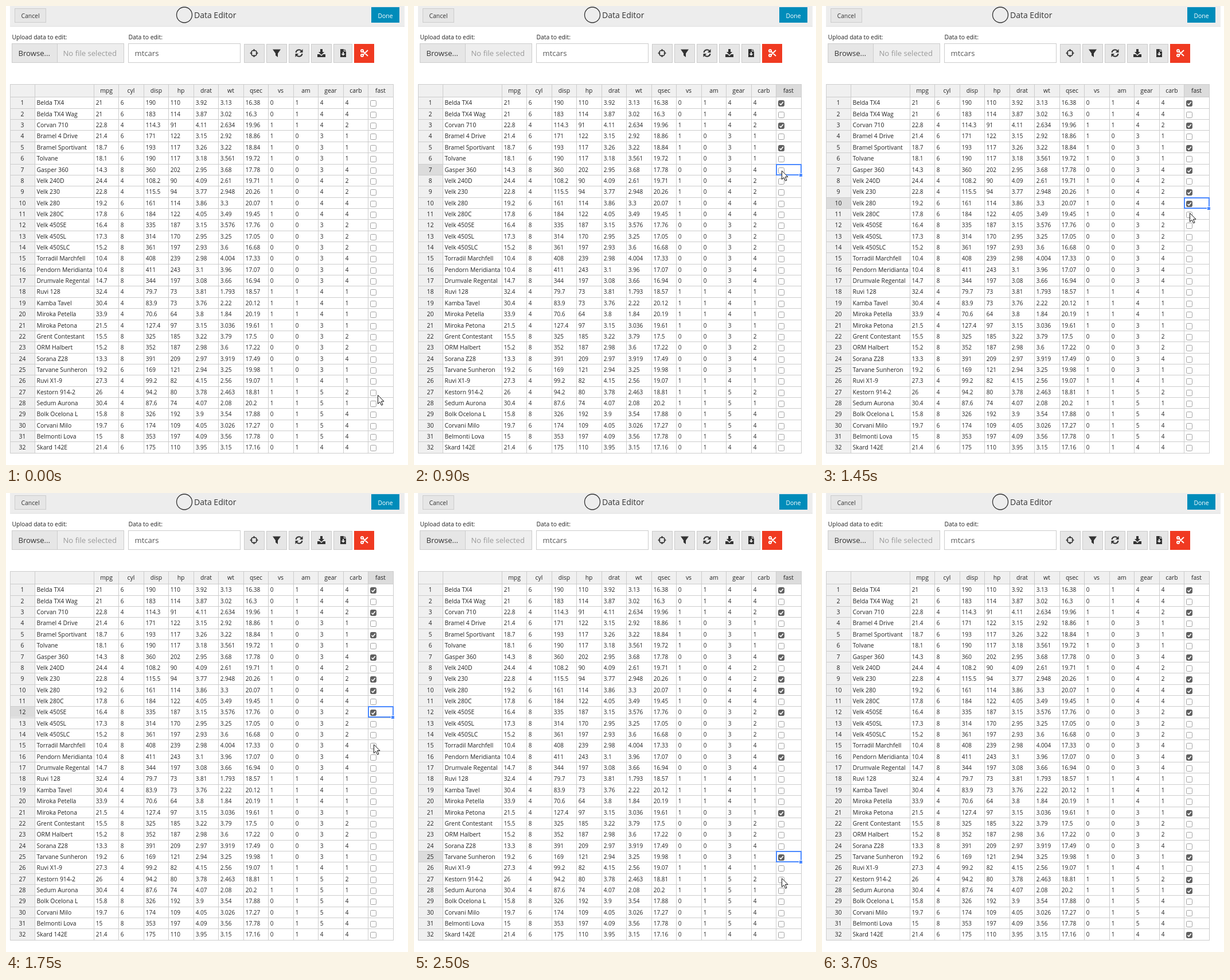
Write an HTML page with a canvas that moves like this. It is 701 by 799 pixels and loops after 3.8 s.

```html
<!DOCTYPE html>
<html lang="en">
<head>
<meta charset="utf-8">
<title>Data Editor</title>
<style>
  html, body { margin: 0; width: 701px; height: 799px; overflow: hidden; background: #fff; }
  canvas { display: block; }
</style>
</head>
<body>
<canvas id="stage" width="701" height="799"></canvas>
<script>
const ctx = document.getElementById('stage').getContext('2d');
const LOOP = 3800, STEP = 50, DESELECT = 3450;
const SMALL = 10.4, LARGE = 13.1;

const headers = 'mpg cyl disp hp drat wt qsec vs am gear carb fast'.split(' ');
const cars = `Belda TX4|21, Belda TX4 Wag|21, Corvan 710|22.8, Bramel 4 Drive|21.4,
Bramel Sportivant|18.7, Tolvane|18.1, Gasper 360|14.3, Velk 240D|24.4, Velk 230|22.8,
Velk 280|19.2, Velk 280C|17.8, Velk 450SE|16.4, Velk 450SL|17.3, Velk 450SLC|15.2,
Torradil Marchfell|10.4, Pendorn Meridianta|10.4, Drumvale Regental|14.7, Ruvi 128|32.4,
Kamba Tavel|30.4, Miroka Petella|33.9, Miroka Petona|21.5, Grent Contestant|15.5,
ORM Halbert|15.2, Sorana Z28|13.3, Tarvane Sunheron|19.2, Ruvi X1-9|27.3, Kestorn 914-2|26,
Sedum Aurona|30.4, Bolk Ocelona L|15.8, Corvani Milo|19.7, Belmonti Lova|15, Skard 142E|21.4`
  .split(/,\s+/).map(entry => entry.split('|'));

// Repeatable noise in -1..1
const noise = (row, salt) => {
  const v = Math.sin(row * 12.9898 + salt * 78.233) * 43758.5453;
  return 2 * (v - Math.floor(v)) - 1;
};
const within = (v, lo, hi) => v >= lo && v <= hi;

// Plausible specifications that follow from fuel economy and model group
function specs(mpg, row) {
  const cyl = mpg < 17.5 ? 8 : mpg <= 21.4 ? 6 : 4;
  const am = +(row <= 3 || within(row, 18, 20) || row >= 26);
  const gear = within(row, 27, 31) ? 5 : am || within(row, 8, 11) ? 4 : 3;
  const vs = +(cyl === 4 || cyl === 6 && !am);
  const carb = cyl === 8 ? (mpg < 15 || am ? 4 : 2)
    : cyl === 6 ? (vs && gear === 3 ? 1 : 4)
    : mpg > 27 || gear === 3 ? 1 : 2;
  const vary = (mean, spread, digits, salt) => +(mean + spread * noise(row, salt)).toFixed(digits);
  const disp = cyl === 4 ? vary(220 - 4.6 * mpg, 9, 1, 1) : vary(cyl === 6 ? 180 : 560 - 14 * mpg, 20, 0, 1);
  const hp = vary(cyl === 4 ? 155 - 2.7 * mpg : cyl === 6 ? 116 : 330 - 9 * mpg, 7, 0, 2);
  const drat = vary(gear === 3 ? 3.1 : 3.95, .2, 2, 3);
  const wt = vary(am ? 5.1 - .1 * mpg : 5 - .09 * mpg, .2, row % 3 ? 2 : 3, 4);
  const qsec = vary(vs ? 19.4 : 17, .9, 2, 5);
  return [mpg, cyl, disp, hp, drat, wt, qsec, vs, am, gear, carb];
}
const table = cars.map(([name, mpg], i) => ({ name, values: specs(+mpg, i + 1) }));

const colX = k => Math.floor(153 + 43.53 * k);
const rowY = r => Math.round(158.4 + 19.355 * (r - 1));

// Quick clicks first, then a slower steady pace
const clicks = [1, 3, 5, 7, 9, 10, 12, 16, 21, 25, 27, 28, 32]
  .map((row, k) => ({ row, time: k < 4 ? 450 + 150 * k : 1100 + 250 * (k - 4) }));

// [time, x, y] of the pointer tip
const path = [
  [0, 648, 677], [180, 670, 430],
  ...clicks.map(({ row, time }) => [time, 641, 147 + 19.9 * row]),
  [3300, 640, 792], [3550, 712, 790], [LOOP, 712, 790],
];

function box(x, y, w, h, fill, border) {
  ctx.fillStyle = border || fill;
  ctx.fillRect(x, y, w, h);
  if (border) {
    ctx.fillStyle = fill;
    ctx.fillRect(x + 1, y + 1, w - 2, h - 2);
  }
}

function text(str, x, y, size = SMALL, color = '#222', align = 'left') {
  ctx.font = `${size}px "Open Sans", sans-serif`;
  ctx.fillStyle = color;
  ctx.textAlign = align;
  ctx.fillText(str, x, y);
}

function icon(x, d, { fill = false, color = '#333', width = 2 } = {}) {
  ctx.save();
  ctx.translate(x, 82);
  ctx.fillStyle = ctx.strokeStyle = color;
  ctx.lineWidth = width;
  const shape = new Path2D(d);
  fill ? ctx.fill(shape) : ctx.stroke(shape);
  ctx.restore();
}

function drawHeader() {
  box(7, 0, 688, 36, '#ededed');
  box(7, 35, 688, 1, '#e0e0e0');
  box(15, 4, 55, 25, '#e6e6e6', '#ccc');
  text('Cancel', 42.5, 21, SMALL, '#333', 'center');
  ctx.strokeStyle = '#333';
  ctx.lineWidth = 1.3;
  ctx.beginPath();
  ctx.arc(311, 15.5, 13.5, 0, 7);
  ctx.stroke();
  text('Data Editor', 328, 20.5, 14, '#333');
  box(637, 2, 49, 27, '#008cba');
  text('Done', 661.5, 21, SMALL, '#fff', 'center');
}

function drawToolbar() {
  text('Upload data to edit:', 10.5, 58);
  text('Data to edit:', 213.5, 58);
  box(89, 65, 117, 34, '#eee', '#ccc');
  box(10, 65, 80, 34, '#e6e6e6', '#ccc');
  text('Browse...', 21.5, 86.5, LARGE, '#333');
  text('No file selected', 99.5, 86.5, LARGE, '#999');
  box(213, 65, 196, 34, '#fff', '#ccc');
  text('mtcars', 224.5, 86.5, LARGE, '#555');

  for (let k = 0; k < 5; k++) box(Math.round(415 + 39.1 * k), 66, k < 4 ? 36 : 33, 33, '#e6e6e6', '#ccc');
  box(607, 66, 35, 33, '#f03a21');

  icon(432.5, 'M5 0A5 5 0 1 1-5 0A5 5 0 1 1 5 0M0-7V-3M0 7V3M-7 0H-3M7 0H3', { width: 1.7 });
  icon(472, 'M-7-6.5H7L2 .5V7L-2 4V.5Z', { fill: true });
  icon(511, 'M-5.5-1A5.5 5.5 0 0 1 4-4M5.5 1A5.5 5.5 0 0 1-4 4');
  icon(511, 'M6.5-7V-1H.8ZM-6.5 7V1H-.8Z', { fill: true });
  icon(550, 'M-2-7H2V-2H5L0 3L-5-2H-2ZM-7 2H-3L0 5L3 2H7V7H-7Z', { fill: true });
  icon(588, 'M-5-7H1V-3H5V7H-5ZM2-7L5-4H2Z', { fill: true });
  icon(588, 'M-1-2H1V1H3.5L0 4.5L-3.5 1H-1Z', { fill: true, color: '#e6e6e6' });
  icon(625, 'M-2-4A2 2 0 1 1-6-4A2 2 0 1 1-2-4M-2 4A2 2 0 1 1-6 4A2 2 0 1 1-2 4M-2.5-3L6 5M-2.5 3L6-5', { color: '#fff' });
}

function drawCheckbox(y, checked) {
  ctx.beginPath();
  ctx.roundRect(635.5, y + 6.5, 10, 10, 2);
  ctx.fillStyle = checked ? '#606060' : '#fff';
  ctx.fill();
  ctx.lineWidth = 1;
  ctx.strokeStyle = checked ? '#606060' : '#a0a0a0';
  ctx.stroke();
  if (!checked) return;
  ctx.beginPath();
  ctx.moveTo(637.5, y + 11.7);
  ctx.lineTo(639.7, y + 14);
  ctx.lineTo(643.8, y + 9);
  ctx.lineWidth = 1.6;
  ctx.strokeStyle = '#fff';
  ctx.stroke();
}

function drawTable(t) {
  const active = t < DESELECT && clicks.filter(c => c.time <= t).pop();
  const selected = active ? active.row : 0;
  const ticked = new Set(clicks.filter(c => c.time + STEP <= t).map(c => c.row));
  const bottom = rowY(33);

  box(7, 136, 669, 22, '#f0f0f0');
  box(7, 136, 43, bottom - 136, '#f0f0f0');
  if (selected) {
    box(colX(11), 136, 44, 22, '#dcdcdc');
    box(7, rowY(selected), 43, 19, '#dcdcdc');
  }
  for (const x of [7, 50, ...headers.map((_, k) => colX(k)), colX(12)]) box(x, 136, 1, bottom - 135, '#ccc');
  box(7, 136, 669, 1, '#ccc');
  for (let r = 1; r <= 33; r++) box(7, rowY(r), 669, 1, '#ccc');

  headers.forEach((name, k) => text(name, colX(k) + 22, 150.5, SMALL, '#222', 'center'));
  table.forEach(({ name, values }, i) => {
    const y = rowY(i + 1);
    text(i + 1, 28.5, y + 14, SMALL, '#222', 'center');
    text(name, 53.5, y + 14);
    values.forEach((v, k) => text(v, colX(k) + 3.7, y + 14, 10));
    drawCheckbox(y, ticked.has(i + 1));
  });

  if (selected) {
    const y = rowY(selected);
    ctx.strokeStyle = '#4b89ff';
    ctx.lineWidth = 2;
    ctx.strokeRect(632, y + 1, 43, 18);
    box(671, y + 16, 7, 7, '#fff');
    box(672, y + 17, 5, 5, '#4b89ff');
  }
}

function drawPointer(t) {
  const i = path.findIndex(p => p[0] > t);
  const [t0, x0, y0] = path[i - 1], [t1, x1, y1] = path[i];
  const f = (t - t0) / (t1 - t0);
  const ease = f * f * (3 - 2 * f);
  ctx.save();
  ctx.translate(x0 + (x1 - x0) * ease, y0 + (y1 - y0) * ease);
  const arrow = new Path2D('M.5 .5V15.5L4 12.2L6.6 18L9 17L6.4 11.2H11Z');
  ctx.fillStyle = '#fff';
  ctx.fill(arrow);
  ctx.strokeStyle = '#111';
  ctx.lineWidth = 1;
  ctx.stroke(arrow);
  ctx.restore();
}

function draw(now) {
  const t = Math.floor(now % LOOP / STEP) * STEP;
  box(0, 0, 701, 799, '#fff');
  drawHeader();
  drawToolbar();
  drawTable(t);
  drawPointer(t);
}

const start = performance.now();
function tick() {
  draw(performance.now() - start);
  requestAnimationFrame(tick);
}
tick();
</script>
</body>
</html>
```
